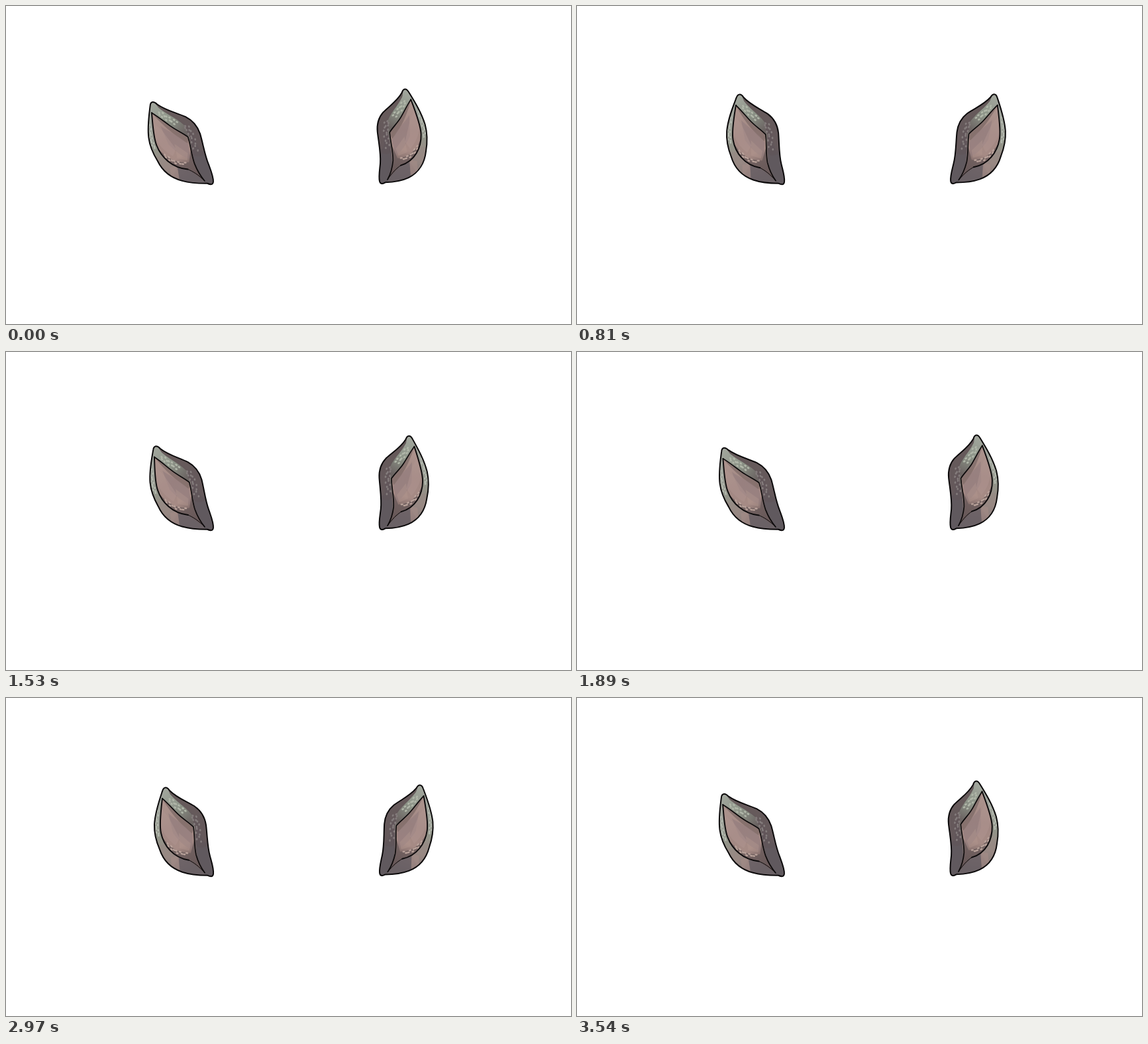
These frames come from a looping animation (853x480 px, 3.57 s). An HTML page with a canvas:

```html
<!DOCTYPE html>
<html>
<head>
<meta charset="utf-8">
<style>
html, body { margin: 0; width: 100%; height: 100%; overflow: hidden; background: #fff; }
canvas { display: block; }
</style>
</head>
<body>
<canvas id="stage" width="853" height="480"></canvas>
<script>
const ctx = document.getElementById('stage').getContext('2d');
const BASE = { x: 310, y: 268 }, HEIGHT = 133;
const STEP = 30, LOOP = 3570, SWING = 1800;
let pose;

// The bend grows with the height above the ear's fixed base.
function warp(x, y) {
  const dx = (x - BASE.x) * pose.width, dy = y - BASE.y;
  const a = pose.bend * Math.PI / 180 * Math.pow(Math.max(0, -dy) / HEIGHT, pose.curve);
  const turned = dx * Math.sin(a) + dy * Math.cos(a);
  return [BASE.x + dx * Math.cos(a) - dy * Math.sin(a), y + 0.8 * (turned - dy)];
}

const shape = d => new Path2D(d.replace(/([\d.]+),([\d.]+)/g,
  (_, x, y) => warp(+x, +y).map(v => v.toFixed(2)).join()));

function fill(d, color, alpha = 1) {
  ctx.globalAlpha = alpha;
  ctx.fillStyle = color;
  ctx.fill(shape(d));
  ctx.globalAlpha = 1;
}

function line(d, width) {
  ctx.lineWidth = width;
  ctx.strokeStyle = '#0b090a';
  ctx.stroke(shape(d));
}

function gradient(x0, y0, x1, y1, ...colors) {
  const g = ctx.createLinearGradient(...warp(x0, y0), ...warp(x1, y1));
  colors.forEach((c, i) => g.addColorStop(i / (colors.length - 1), c));
  return g;
}

// Scatters scales along a quadratic curve.
function scales([x0, y0, x1, y1, x2, y2], count, spread, rx, ry, color) {
  ctx.fillStyle = color;
  for (let i = 0; i < count; i++) {
    const t = i / (count - 1), u = 1 - t;
    const tx = u * (x1 - x0) + t * (x2 - x1), ty = u * (y1 - y0) + t * (y2 - y1);
    const off = spread * Math.sin(i * 2.4) / Math.hypot(tx, ty);
    const [x, y] = warp(u * u * x0 + 2 * u * t * x1 + t * t * x2 - ty * off,
                        u * u * y0 + 2 * u * t * y1 + t * t * y2 + tx * off);
    ctx.beginPath();
    ctx.ellipse(x, y, rx, ry, Math.atan2(ty, tx), 0, 7);
    ctx.fill();
  }
}

const OUTLINE = 'M236,140C238,133 243,133 247,139C258,150 272,155 285,163C295,170 300,178 302,191' +
  'C304,208 304,224 308,238C311,249 314,258 313,265C312,270 308,269 304,267' +
  'C292,267 278,266 266,262C248,256 237,243 232,228C226,214 223.5,204 224,190C225,172 231,155 236,140Z';
const INNER_TOP = 'M236,151C245,159 251,166 259,174C267,182 276,187 283,194' +
  'C285,208 284,222 287,236C290,247 294,255 300,263';
const INNER = INNER_TOP + 'C291,253 284,248 276,244C252,240 238,222 234,203C231,190 234,168 236,151Z';

function drawEar() {
  ctx.save();
  ctx.clip(shape(OUTLINE));
  fill(OUTLINE, gradient(230, 175, 272, 262, '#a0a49c', '#929489', '#9b8783', '#6c6265'));
  fill('M229,222L246,219L262,236L250,260L238,248Z', '#968984', 0.55);
  fill('M259,235L278,240L302,264L300,270L264,265Z', '#6a6165', 0.85);
  fill('M249,240L261,237L262,264L250,258Z', '#a58d87', 0.6);
  // Dark back of the ear and its pale upper rim
  fill('M244,136L309,166L320,272L302,267C289,251 286,235 285,194C278,173 260,159 248,145Z',
    gradient(265, 155, 306, 250, '#655a5a', '#62565a', '#5d565a'));
  fill('M237,136L244,140C255,155 270,162 281,176L284,194L260,175L236,151Z',
    gradient(240, 140, 282, 185, '#a0a59b', '#8d9488', '#6b6462'));
  fill('M250,146C268,155 286,162 294,174L302,190L303,218C292,218 296,188 285,177C275,166 261,159 250,146Z',
    '#695b5e', 0.55);
  fill('M287,222C294,229 302,222 308,223L314,267L304,266C291,252 289,238 287,222Z', '#625b60', 0.7);

  // Inner ear
  fill(INNER, gradient(242, 165, 285, 248, '#aa918b', '#a28883', '#a68b85', '#685757'));
  fill('M237,153L259,174L284,194L281,204C268,193 254,181 237,153Z', '#786663', 0.65);
  fill('M245,173C255,183 272,192 282,206L281,228C268,224 257,209 252,203Z', '#917c7e', 0.6);
  fill('M236,168L246,180L262,211L256,222C244,213 234,199 234,189Z', '#b09690', 0.45);
  fill('M261,203L279,219L277,230L262,226Z', '#b19690', 0.4);
  fill('M236,209C247,226 262,234 279,233L284,214L287,236L300,263L276,244C252,240 240,224 236,209Z',
    '#695b5a', 0.8);

  scales([247, 152, 256, 163, 270, 171], 13, 3.2, 2, 1.4, '#b0b6a8');
  scales([282, 177, 291, 188, 291, 216], 16, 3.6, 1.8, 1.4, '#837b7b');
  scales([229, 170, 225, 191, 230, 207], 14, 1.8, 1.7, 1.2, '#b6bcb1');
  scales([244, 219, 254, 234, 273, 235], 11, 1.8, 2.2, 1.3, '#b9a29a');
  ctx.restore();

  line(INNER_TOP, 1.7);
  line('M236,151C234,168 231,190 234,203C238,222 252,240 276,244', 1.9);
  line('M276,244C284,248 291,253 300,263', 1);
  line(OUTLINE, 2);
}

function render(now) {
  const time = Math.floor(now / STEP) * STEP % LOOP;
  const swing = (1 - Math.cos(2 * Math.PI * time / SWING)) / 2;
  ctx.fillStyle = '#fff';
  ctx.fillRect(0, 0, 853, 480);
  ctx.lineJoin = ctx.lineCap = 'round';

  ctx.save();
  ctx.translate(0, 0.7);
  pose = { bend: 11.1 * swing - 8.8, curve: 0.5, width: 1 };
  drawEar();
  ctx.restore();

  ctx.save();
  ctx.translate(877, -0.5);
  ctx.scale(-1, 1);
  pose = { bend: 12.3 - 11.7 * swing, curve: 0.35, width: 0.94 };
  drawEar();
  ctx.restore();
}

let start;
function tick(now) {
  start ??= now;
  render(now - start);
  requestAnimationFrame(tick);
}
render(0);
requestAnimationFrame(tick);
</script>
</body>
</html>
```
